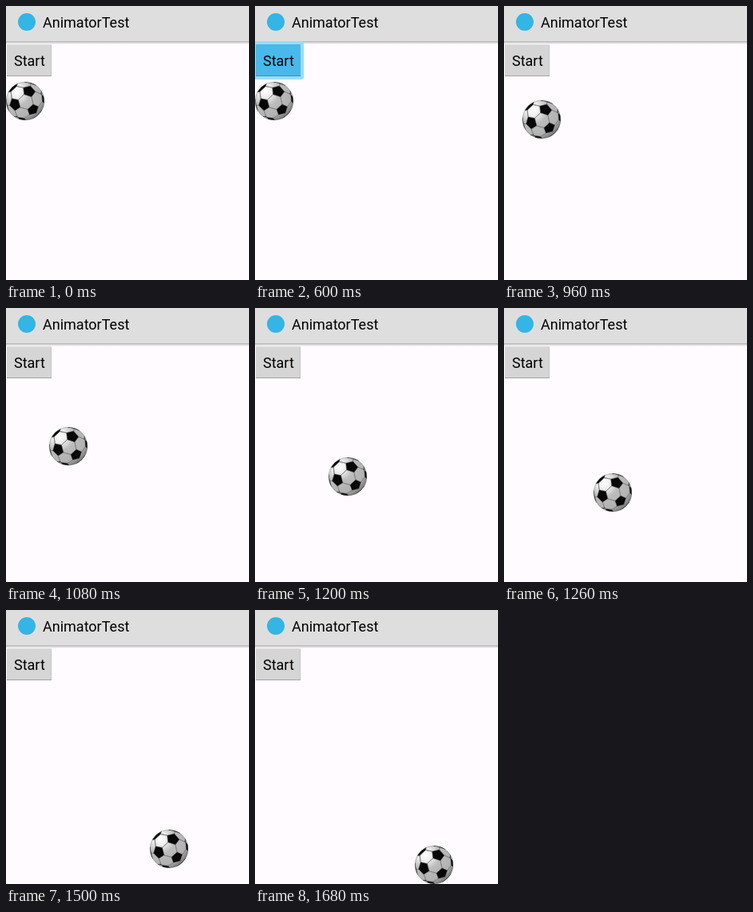
Recreate the animation shown at these times as an HTML page. Size 304x343 px, loop 2280 ms.

```html
<!DOCTYPE html>
<html lang="en">
<head>
<meta charset="utf-8">
<title>AnimatorTest</title>
<style>
  html, body { margin: 0; width: 100%; height: 100%; overflow: hidden; background: #fffbff; }
  svg { display: block; width: 304px; height: 343px; }
  text { font: 18px Roboto, sans-serif; fill: #000; }
</style>
</head>
<body>
<svg viewBox="0 0 304 343">
  <defs>
    <radialGradient id="leather" cx=".27" cy=".24" r=".85">
      <stop offset="0" stop-color="#fff"/>
      <stop offset=".22" stop-color="#ececec"/>
      <stop offset=".45" stop-color="#bcbcbc"/>
      <stop offset=".8" stop-color="#b2b2b2"/>
      <stop offset="1" stop-color="#707070"/>
    </radialGradient>
    <linearGradient id="shadow" x2="0" y2="1">
      <stop offset="0" stop-color="#b4b2b4"/>
      <stop offset="1" stop-color="#fffbff"/>
    </linearGradient>
    <clipPath id="rim"><circle r="24"/></clipPath>
  </defs>

  <rect width="304" height="343" fill="#fffbff"/>
  <rect width="304" height="44" fill="#dedede"/>
  <rect y="44" width="304" height="4" fill="url(#shadow)"/>
  <circle cx="26" cy="20" r="11" fill="#33b5e5"/>
  <text x="46" y="27">AnimatorTest</text>

  <g id="normal">
    <rect x="1" y="48" width="56" height="40" rx="1" fill="#d5d5d5"/>
    <path d="M1.5 48.5H56.5" stroke="#dfdfdf"/>
    <path d="M1 87.5H57" stroke="#a3a3a3"/>
    <path d="M56.5 49V87" stroke="#c6c6c6"/>
  </g>
  <g id="pressed" visibility="hidden">
    <rect x="-3" y="44" width="64" height="48" rx="3" fill="#9bdcf5"/>
    <rect x="1" y="48" width="56" height="40" rx="1" fill="#48b9ea"/>
    <path d="M1 87.5H57" stroke="#3795bd"/>
  </g>
  <text x="10" y="75">Start</text>

  <g id="ball">
    <circle r="24" fill="url(#leather)"/>
    <g clip-path="url(#rim)">
      <path id="seams" fill="none" stroke="#858585" stroke-width=".9"/>
      <path id="patches" fill="#080808" stroke="#4a4a4a" stroke-width=".5"/>
    </g>
    <circle r="23.7" fill="none" stroke="#444" stroke-opacity=".45" stroke-width=".6"/>
  </g>
</svg>
<script>
const $ = id => document.getElementById(id);
const R = 24, LOOP = 2280, STEP = 60;
const MOVE_START = 756, MOVE_TIME = 936, DISTANCE = 200;

const unit = v => { const l = Math.hypot(...v); return v.map(c => c / l); };
const dot = (a, b) => a.reduce((s, c, i) => s + c * b[i], 0);
const rad = deg => deg * Math.PI / 180;

// Icosahedron corners seen along a face, tipped slightly down and right.
function corners() {
  const half = [];
  for (let k = 0; k < 3; k++) {
    for (const [polar, turn] of [[37.38, -73], [79.19, -13]]) {
      const p = rad(polar), a = rad(turn + 120 * k);
      half.push([Math.sin(p) * Math.cos(a), Math.sin(p) * Math.sin(a), Math.cos(p)]);
    }
  }
  return half.concat(half.map(v => v.map(c => -c)));
}
const tip = ([x, y, z]) => unit([x + z * .04, y + z * .06, z]);
const third = (a, b) => tip(unit(a.map((c, i) => c + (b[i] - c) / 3)));

// Points behind the horizon slide out to the rim.
function project([x, y, z]) {
  const s = z < 0 ? R / Math.hypot(x, y) : R;
  return (x * s).toFixed(2) + ' ' + (y * s).toFixed(2);
}

function drawBall() {
  const all = corners();
  let patches = '', seams = '';
  for (const v of all) {
    const [cx, cy, cz] = tip(v);
    const near = all.filter(n => n !== v && dot(n, v) > .4);
    const ring = near.map(n => third(v, n));
    const angle = p => Math.atan2(p[1] - cy * .8, p[0] - cx * .8);
    if (cz > -.2) {
      ring.sort((a, b) => angle(a) - angle(b));
      patches += 'M' + ring.map(project).join('L') + 'Z';
    }
    for (const n of near) {
      const a = third(v, n), b = third(n, v);
      if (a[2] > 0 && b[2] > 0) seams += 'M' + project(a) + 'L' + project(b);
    }
  }
  $('patches').setAttribute('d', patches);
  $('seams').setAttribute('d', seams);
}

function render(time) {
  const t = Math.floor(time % LOOP / STEP) * STEP;
  const down = t === 600;
  $('pressed').setAttribute('visibility', down ? 'visible' : 'hidden');
  $('normal').setAttribute('visibility', down ? 'hidden' : 'visible');

  const p = Math.min(1, Math.max(0, (t - MOVE_START) / MOVE_TIME));
  const d = Math.round(DISTANCE * (1 - Math.cos(Math.PI * p)) / 2);
  $('ball').setAttribute('transform', `translate(${24 + d} ${119 + d})`);
}

drawBall();
const start = performance.now();
function tick() {
  render(performance.now() - start);
  requestAnimationFrame(tick);
}
tick();
</script>
</body>
</html>
```
